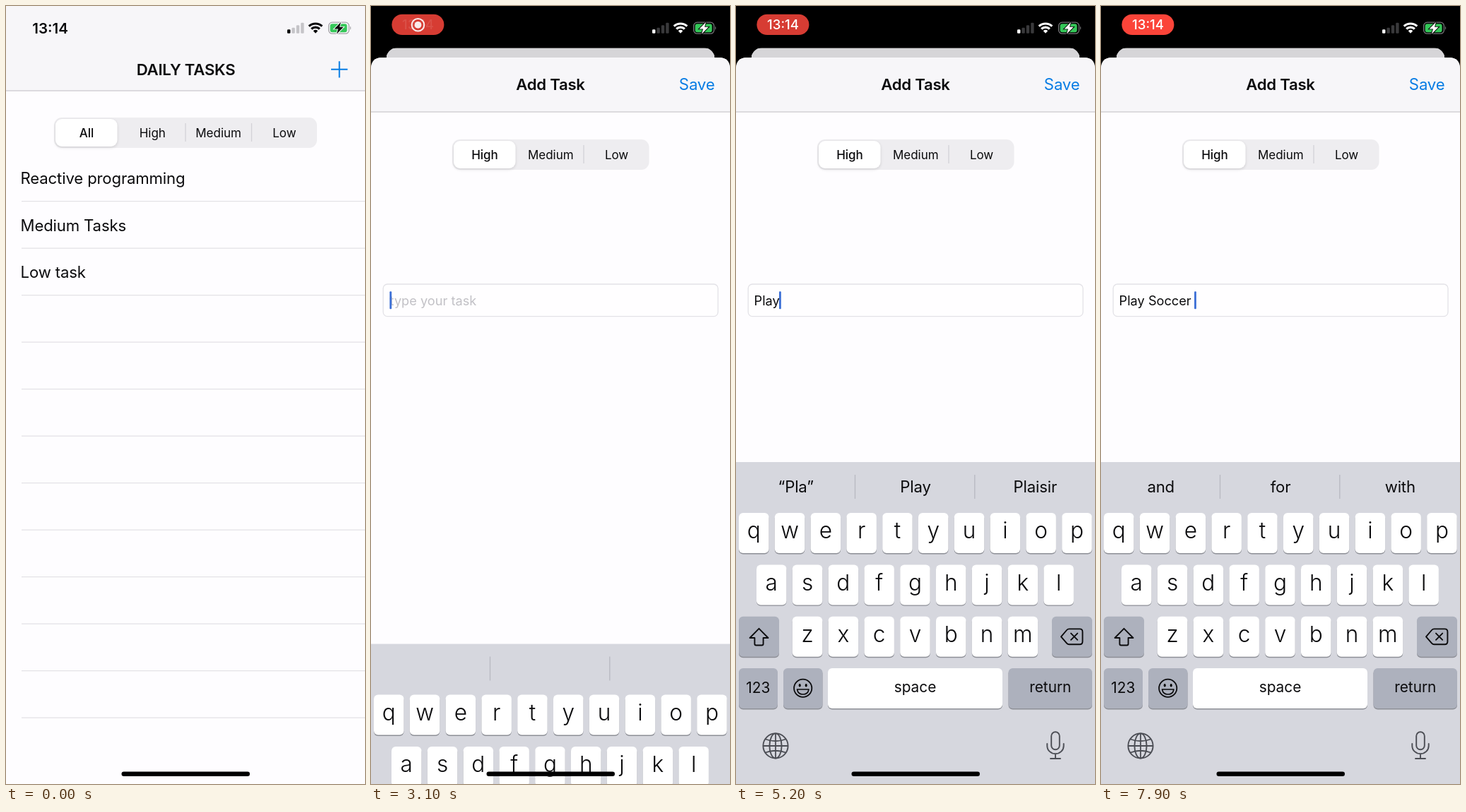
Write an HTML page that moves like this. It is 508 px wide and 1102 px high and loops after 8000 ms.

```html
<!DOCTYPE html>
<html lang="en">
<head>
<meta charset="utf-8">
<title>Daily tasks</title>
<style>
  html, body { margin: 0; width: 100%; height: 100%; overflow: hidden; background: #000; }
  svg { display: block; width: 100vw; height: 100vh; }
  text { font-family: Inter, Roboto, sans-serif; white-space: pre; fill: #0b0b0d; }
  .body { font-size: 22.15px; letter-spacing: -.15px; }
  .title { font-size: 22.15px; letter-spacing: -.26px; font-weight: 600; }
  .seg { font-size: 17px; }
  .field { font-size: 18.2px; }
  .low { font-size: 31.6px; font-weight: 340; }
  .cap { font-size: 29px; font-weight: 340; }
  .fn { font-size: 20.8px; }
  .big { font-size: 46px; font-weight: 300; }
  .mid { text-anchor: middle; }
</style>
</head>
<body>
<svg id="stage" viewBox="0 0 508 1102"></svg>
<script>
const LOOP = 8000, STEP = 100, W = 508, H = 1102;
const PAPER = '#fefdff', BAR = '#f7f6f9', BLUE = '#067ce4', INK = '#0b0b0d', GREY = '#adb1bd';
const KEY_W = 42.5, KEY_H = 57, PITCH = 50.8;
const rows = [['qwertyuiop', 4, 718], ['asdfghjkl', 29, 791.4], ['zxcvbnm', 79.8, 864.8]];

// time a key goes down, key, text afterwards, suggestions that follow
const typing = [
  [4600, 'p', 'P', '“P” Pas Plus'],
  [4800, 'l', 'Pl', '“Pl” Plus Play'],
  [5000, 'a', 'Pla', '“Pla” Play Plaisir'],
  [5100, 'y', 'Play', '“Play” Player Plays'],
  [5700, 'space', 'Play ', 'with the and'],
  [6200, 's', 'Play S', '“S” So Super'],
  [6700, 'o', 'Play So', '“So” Son Soon'],
  [6900, 'c', 'Play Soc', '“Soc” Soccer Social'],
  [7100, 'c', 'Play Socc', '“Socc” Soccer Social'],
  [7300, 'e', 'Play Socce', '“Socce” Soccer Soccers'],
  [7600, 'pick', 'Play Soccer ', 'and for with']
];
const shifts = [[4300, 4700], [5900, 6300]];

const $ = id => document.getElementById(id);
const clamp = (v, a = 0, b = 1) => Math.min(b, Math.max(a, v));
const text = (x, y, cls, s, extra = '') => `<text x="${x}" y="${y}" class="${cls}" ${extra}>${s}</text>`;
const rect = (x, y, w, h, r, fill, extra = '') =>
  `<rect x="${x}" y="${y}" width="${w}" height="${h}" rx="${r}" fill="${fill}" ${extra}/>`;
const line = (d, color, w, extra = '') =>
  `<path d="${d}" fill="none" stroke="${color}" stroke-width="${w}" ${extra}/>`;

function segments(x, y, labels, dividers) {
  const cell = 93.5;
  return rect(x, y, cell * labels.length - 2, 43, 11, '#eeedf0') +
    rect(x + 2, y + 3.5, 87.5, 39, 9, '#000', 'opacity=".13" filter="url(#soft)"') +
    rect(x + 2, y + 2, 87.5, 39, 9, '#fff') +
    dividers.map(d => line(`M${d} ${y + 8}v26`, '#d3d2d7', 1.3)).join('') +
    labels.map((s, i) => text(x + 46 + i * 93.3, y + 27.6, 'seg mid', s,
      `font-weight="${i ? 400 : 500}"`)).join('');
}

function statusIcons(ink, faint, halo, shell) {
  const arc = r => {
    const dx = r * Math.sin(.74), dy = r * Math.cos(.74);
    return `M${438 - dx} ${38.8 - dy}A${r} ${r} 0 0 1 ${438 + dx} ${38.8 - dy}`;
  };
  let s = '';
  for (let i = 0; i < 4; i++) {
    const h = [5.5, 8, 11.5, 15][i];
    s += rect(398 + i * 6.4, 38.7 - h, 4.4, h, 1.2, i ? faint : ink);
  }
  s += line(arc(13.8), ink, 3.2) + line(arc(8.6), ink, 3.2) + `<path d="${arc(4.8)}L438 38.8z" fill="${ink}"/>`;
  s += rect(456.6, 23.2, 28.8, 16, 5, 'none', `stroke="${shell}" stroke-width="1.3"`);
  s += `<path d="M487 28.5q2.4 2.7 0 5.4z" fill="${shell}"/>` + rect(458.6, 25.2, 24, 12, 3.2, '#35c759');
  return s + `<path d="M474 22.8L464.5 32.4H470L467.8 39.8L477.6 29.8H472Z" fill="${ink}" stroke="${halo}"
    stroke-width="1.8" paint-order="stroke"/>`;
}

function listScreen() {
  let s = rect(0, 0, W, H, 0, PAPER) + rect(0, 0, W, 119.5, 0, BAR) + line('M0 120H508', '#d2d1d5', 1.3);
  s += text(254.5, 97.6, 'title mid', 'DAILY TASKS');
  s += line('M460 89.8h23.4M471.7 78.2v23.4', BLUE, 2, 'id="plus"');
  s += segments(68, 158, ['All', 'High', 'Medium', 'Low'], [254, 347.5]);
  ['Reactive programming', 'Medium Tasks', 'Low task'].forEach((t, i) => s += text(20.6, 252 + i * 66.5, 'body', t));
  for (let i = 0; i < 12; i++) s += line(`M22 ${276.7 + i * 66.5}H508`, '#e3e2e6', 1.3);
  return s + rect(0, 0, W, H, 0, '#000', 'id="dim"');
}

function sheetScreen() {
  return `<path d="M0 89q0-16 16-16H492q16 0 16 16V1042a61 61 0 0 1-61 61H61a61 61 0 0 1-61-61z" fill="${PAPER}"/>
    <path d="M0 150V89q0-16 16-16H492q16 0 16 16V150z" fill="${BAR}"/>` +
    line('M0 150H508', '#d2d1d5', 1.3) +
    text(254, 119.4, 'title mid', 'Add Task') +
    text(486.5, 119.4, 'body', 'Save', `text-anchor="end" style="fill:${BLUE}"`) +
    segments(115, 189, ['High', 'Medium', 'Low'], [301]) +
    rect(17.2, 394, 473.8, 45.6, 6, '#fff', 'fill-opacity=".4" stroke="#e3e2e7" stroke-width="1.3"') +
    text(26.6, 423.6, 'field', 'type your task', 'id="hint" style="fill:#c2c1c6"') +
    text(25.6, 423.6, 'field', '', 'id="entry"') +
    rect(26.4, 404.3, 2.8, 25, 1, '#3b6fd6', 'id="caret"');
}

const keyBox = (x, y, w, fill, id = '') =>
  rect(x, y + 1.4, w, KEY_H, 6, '#8d8f96') + rect(x, y, w, KEY_H, 6, fill, id && `id="${id}"`);

function keyIcons() {
  const soft = '#4c4e55', round = 'stroke-linejoin="round" stroke-linecap="round"';
  return line('M32.5 881.8L45.5 895H38.6V903.5q0 2-2 2H28.4q-2 0-2-2V895H19.6Z', INK, 1.9, round + ' id="arrow"') +
    line('M460 893.3L468 884q1.4-1.6 3.4-1.6H486.4q4 0 4 4V900.2q0 4-4 4H471.4q-2 0-3.4-1.6Z', INK, 1.9, round) +
    line('M474 888.6l9.2 9.2m0-9.2l-9.2 9.2', INK, 1.9, round) +
    `<circle cx="94.7" cy="966.2" r="12.6" fill="none" stroke="${INK}" stroke-width="1.8"/>
    <ellipse cx="90.2" cy="962.2" rx="1.5" ry="2.2"/><ellipse cx="99.2" cy="962.2" rx="1.5" ry="2.2"/>` +
    line('M86.5 968H103q-1.2 7-8.2 7T86.5 968Z', INK, 1.6, round) +
    line('M38.4 1048h35.2M56 1030.4v35.2M41.5 1038.5q14.5 5.5 29 0M41.5 1057.5q14.5-5.5 29 0', soft, 1.8) +
    `<g fill="none" stroke="${soft}" stroke-width="1.9"><circle cx="56" cy="1048" r="17.6"/>
    <ellipse cx="56" cy="1048" rx="8.6" ry="17.6"/><rect x="446.2" y="1028.3" width="11.6" height="25" rx="5.8"/></g>` +
    line('M440.3 1045v3a11.7 11.2 0 0 0 23.4 0v-3M452 1059.5v6.5M445 1066h14', soft, 1.9, round);
}

function keyboard() {
  let s = rect(0, 646, W, 460, 0, '#d6d7de');
  s += rect(173, 653, 160, 56, 7, '#f0f0f3', 'id="pick"');
  s += line('M168.5 664v34M337.8 664v34', '#b8b9c1', 1.3);
  for (let i = 0; i < 3; i++) s += text(84.7 + i * 169.3, 689, 'body mid', '', `id="sug${i}"`);
  let low = '', cap = '';
  for (const [letters, x0, y] of rows) {
    [...letters].forEach((c, i) => {
      const x = x0 + i * PITCH;
      s += keyBox(x, y, KEY_W, '#fff');
      low += text(x + KEY_W / 2, y + 36.3, 'low mid', c);
      cap += text(x + KEY_W / 2, y + 39, 'cap mid', c.toUpperCase());
    });
  }
  s += `<g id="low">${low}</g><g id="cap">${cap}</g>`;
  s += keyBox(4, 864.8, 57, GREY, 'shift') + keyBox(447, 864.8, 57, GREY);
  s += keyBox(4, 938, 55, GREY) + keyBox(67, 938, 55.5, GREY);
  s += keyBox(130, 938, 247, '#fff', 'space') + keyBox(385.5, 938, 118.5, GREY);
  s += text(31.3, 973.4, 'fn mid', '123') + text(253.5, 971.8, 'fn mid', 'space') + text(444.8, 971.8, 'fn mid', 'return');
  return s + keyIcons() +
    `<g id="pop"><path id="bubble" fill="#fff" filter="url(#cast)"/>${text(0, 0, 'big mid', '', 'id="popText"')}</g>`;
}

$('stage').innerHTML = `<defs>
    <filter id="soft" x="-20%" y="-30%" width="140%" height="160%"><feGaussianBlur stdDeviation="2.2"/></filter>
    <filter id="cast" x="-30%" y="-20%" width="160%" height="140%">
      <feDropShadow dx="0" dy="1" stdDeviation="2" flood-opacity=".3"/></filter>
    <clipPath id="round"><rect id="clip" width="508" height="1102"/></clipPath>
  </defs>` + rect(0, 0, W, H, 0, '#000') +
  `<g id="card"><g clip-path="url(#round)">${listScreen()}</g></g>
  <g id="sheet">${sheetScreen()}</g><g id="keys">${keyboard()}</g>
  <g id="day">${statusIcons('#08080a', '#c5c4c8', '#fff', '#a3a2a6')}</g>
  <g id="night">${statusIcons('#fff', '#39393b', '#000', '#77777a')}</g>` +
  text(62.6, 38.5, 'mid', '13:14', 'id="clock" font-size="20.6" font-weight="600"') +
  `<g id="pill">${rect(29.4, 11.7, 74, 29.4, 14.7, '#f00', 'id="red"')}
    <g id="rec"><circle cx="66.5" cy="26.8" r="8.8" fill="none" stroke="#fff" stroke-width="2"/>
    <circle cx="66.5" cy="26.8" r="4.9" fill="#fff"/></g>` +
  text(66.5, 33.2, 'mid', '13:14', 'id="pillTime" font-size="18.6" font-weight="500" style="fill:#fff"') + '</g>' +
  rect(163.5, 1084.5, 181.5, 6.5, 3.25, '#000');

const set = (id, name, value) => $(id).setAttribute(name, value);
const fade = (id, v) => set(id, 'opacity', v);

// critically damped spring, 0 to 1
const spring = ms => {
  const x = Math.max(0, ms) * .01826;
  return 1 - (1 + x) * Math.exp(-x);
};

function showPop(step, caps) {
  const row = step && rows.find(r => r[0].includes(step[1]));
  fade('pop', row ? 1 : 0);
  if (!row) return;
  const x = row[1] + row[0].indexOf(step[1]) * PITCH, y = row[2], bw = 72;
  const bx = clamp(x - 15, 1, W - bw - 1), r = x + KEY_W;
  set('bubble', 'd', `M${x} ${y + 51}V${y + 8}C${x} ${y - 8} ${bx} ${y - 4} ${bx} ${y - 20}V${y - 62}q0-10 10-10H${bx + bw - 10}
    q10 0 10 10V${y - 20}C${bx + bw} ${y - 4} ${r} ${y - 8} ${r} ${y + 8}V${y + 51}q0 6-6 6H${x + 6}q-6 0-6-6z`);
  set('popText', 'x', bx + bw / 2);
  set('popText', 'y', y - 18);
  $('popText').textContent = caps ? step[1].toUpperCase() : step[1];
}

function draw(t) {
  const p = spring(t - 1693), k = spring(t - 3019);
  const scale = 1 - .0855 * p;
  set('card', 'transform', `translate(${W / 2 * (1 - scale)} ${59.6 * p}) scale(${scale})`);
  set('clip', 'rx', 16 * p);
  fade('dim', .135 * p);
  fade('plus', t >= 1500 && t < 1700 ? .25 : 1);
  set('sheet', 'transform', `translate(0 ${1029 * (1 - p)})`);
  set('keys', 'transform', `translate(0 ${456 * (1 - k)})`);
  fade('day', 1 - p);
  fade('night', p);

  const shown = clamp((t - 300) / 300), swap = clamp((t - 3070) / 300);
  const glow = (1 + Math.cos((t - 100) / 1000 * Math.PI)) / 2;
  fade('clock', 1 - shown);
  fade('pill', shown);
  set('red', 'fill', `rgb(${214 + 41 * glow},${60 + 9 * glow},${51 + 7 * glow})`);
  fade('rec', 1 - swap);
  fade('pillTime', swap);

  const caps = shifts.some(([a, b]) => t >= a && t < b);
  fade('low', caps ? 0 : 1);
  fade('cap', caps ? 1 : 0);
  set('shift', 'fill', caps ? '#fff' : GREY);
  set('arrow', 'fill', caps ? INK : 'none');

  // text lands one step after the touch, suggestions two steps after
  const last = lag => typing.filter(s => t >= s[0] + lag).pop();
  const down = typing.find(s => t >= s[0] && t < s[0] + STEP);
  const typed = last(STEP), offer = last(2 * STEP);
  showPop(down, caps);
  set('space', 'fill', down && down[1] === 'space' ? GREY : '#fff');
  fade('pick', down && down[1] === 'pick' ? 1 : 0);
  $('entry').textContent = typed ? typed[2] : '';
  fade('hint', typed ? 0 : 1);
  const words = offer ? offer[3].split(' ') : ['', '', ''];
  words.forEach((w, i) => $('sug' + i).textContent = w);

  const since = t - (typed ? typed[0] + STEP : 3000), beat = since % 1000;
  set('caret', 'x', typed ? 24.8 + $('entry').getComputedTextLength() : 26.4);
  fade('caret', since < 0 ? 0 : beat < 500 ? 1 : beat < 700 ? 1 - (beat - 500) / 200 : clamp((beat - 800) / 200));
}

function tick() {
  const t = performance.now() % LOOP;
  draw(Math.floor(t / STEP) * STEP);
  requestAnimationFrame(tick);
}
tick();
</script>
</body>
</html>
```
